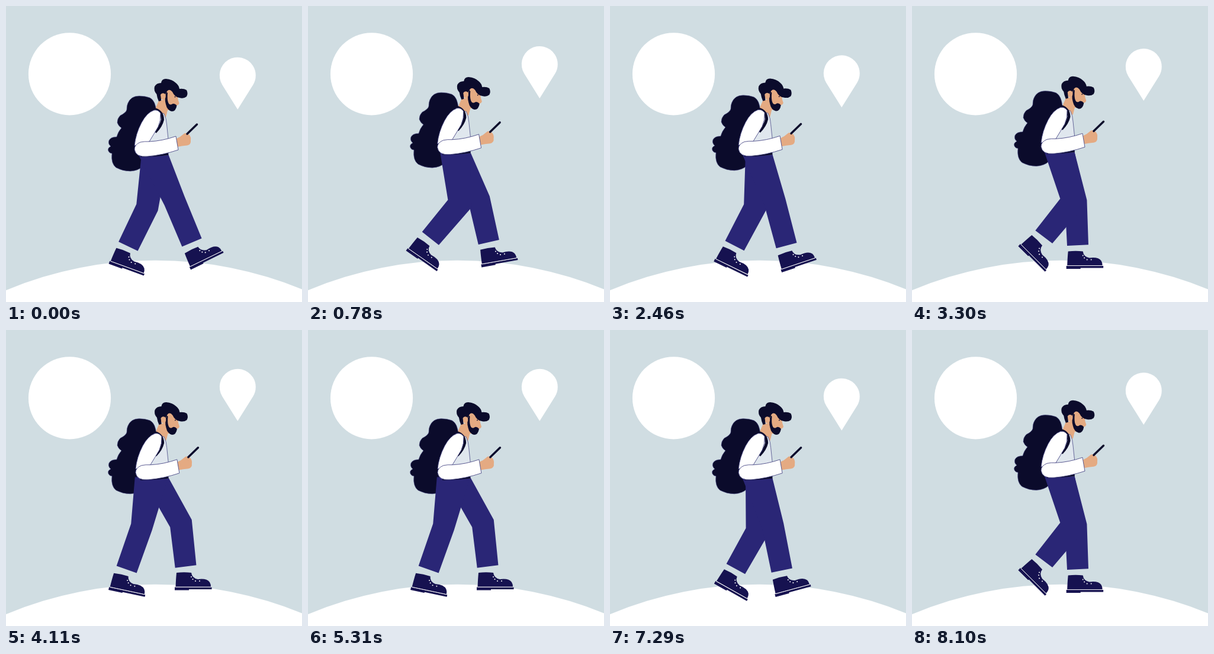
An HTML page with a canvas that plays this animation: 500 px wide and 500 px high, repeating every 8130 ms.

```html
<!DOCTYPE html>
<html lang="en">
<head>
<meta charset="utf-8">
<title>Walking traveller</title>
<style>
  html, body { margin: 0; width: 100%; height: 100%; overflow: hidden; background: #d0dde2; }
  canvas { display: block; width: 500px; height: 500px; }
</style>
</head>
<body>
<canvas id="stage" width="500" height="500"></canvas>
<script>
const ctx = document.getElementById('stage').getContext('2d');
const LOOP = 8130, FRAME = 30, CYCLE = 1200;
const SKY = '#d0dde2', WHITE = '#ffffff', NAVY = '#0b0b2b', PANTS = '#2a2676',
      BOOT = '#161250', SKIN = '#e4aa82', SHIRT = '#e0e7ee', LINE = '#4a4a86';

// Each pose: time, thigh angle, shin angle, boot tilt
const legA = {
  thigh: 82, shin: 76, seat: 27, sag: 0.35, gap: 11.5, heel: -5.3,
  poses: [
    [0, 25, 22.7, -26], [60, 20.4, 14.9, -18.5], [510, -14.9, -19.4, 12],
    [660, -10.5, -34.5, 26], [780, 2.8, -38.4, 35], [900, 13, -37, 45]
  ]
};
const legB = {
  thigh: 86, shin: 73, seat: 21, sag: 0, gap: 10, heel: -3.8,
  poses: [
    [0, -8, -25.7, 20], [60, -4, -27.3, 26], [270, 14, -36, 45],
    [510, 31.3, 7, 0], [780, 26.9, 13, -10], [900, 18, 2.7, 0]
  ]
};

// Smooth periodic blend between poses
function poseAt(poses, t) {
  const n = poses.length;
  t %= CYCLE;
  let i = n - 1;
  while (poses[i][0] > t) i--;
  const [p, q, r, s] = [-1, 0, 1, 2].map(k => {
    const turn = Math.floor((i + k) / n);
    const [time, ...angles] = poses[i + k - turn * n];
    return { time: time + turn * CYCLE, angles };
  });
  const h = r.time - q.time, u = (t - q.time) / h, v = 1 - u;
  return q.angles.map((_, c) => {
    const slope = (a, b) => (b.angles[c] - a.angles[c]) / (b.time - a.time);
    const tangent = (a, b, d) =>
      (slope(a, b) * (d.time - b.time) + slope(b, d) * (b.time - a.time)) / (d.time - a.time);
    return q.angles[c] * v * v * (1 + 2 * u) + r.angles[c] * u * u * (1 + 2 * v)
      + h * u * v * (tangent(p, q, r) * v - tangent(q, r, s) * u);
  });
}

function shape(d, fill, stroke, width = 1) {
  const path = new Path2D(d);
  if (fill) { ctx.fillStyle = fill; ctx.fill(path); }
  if (stroke) { ctx.strokeStyle = stroke; ctx.lineWidth = width; ctx.stroke(path); }
}

function disc(x, y, r, fill) {
  ctx.fillStyle = fill;
  ctx.beginPath();
  ctx.arc(x, y, r, 0, 7);
  ctx.fill();
}

function shifted(x, y, draw) {
  ctx.save();
  ctx.translate(x, y);
  draw();
  ctx.restore();
}

function drawPin(y) {
  const a = Math.asin(30.5 / 57.5);
  ctx.fillStyle = WHITE;
  ctx.beginPath();
  ctx.arc(391.3, y, 30.5, Math.PI - a, a);
  ctx.lineTo(391.3, y + 57.5);
  ctx.fill();
}

function drawBoot() {
  shape('M-13 0Q0 -1.5 12 0Q13 9 23 11Q38 9 43 16Q45 19 45 24H-14.5Q-14 10 -13 0Z', BOOT);
  shape('M-16 24.5H46.5V28H8V29.5H-16Z', BOOT);
  shape('M-14.5 24.2H45.5', null, WHITE, 0.9);
  for (const [x, y] of [[12, 7], [14.5, 11], [19, 14], [26, 14]]) disc(x, y, 1, WHITE);
}

function drawLeg(leg, t, hx, hy) {
  const rad = Math.PI / 180;
  const [thigh, shin, tilt] = poseAt(leg.poses, t);
  const along = ([x, y], d, deg) => [x + d * Math.sin(deg * rad), y + d * Math.cos(deg * rad)];
  const side = ([x, y], d, deg) => [x + d * Math.cos(deg * rad), y - d * Math.sin(deg * rad)];
  const knee = along([hx, hy], leg.thigh, thigh);
  const cuff = along(knee, leg.shin, shin);
  const mid = (thigh + shin) / 2;
  const kneecap = 18.5 + (thigh - shin) ** 2 / 350;
  const seat = leg.seat - leg.sag * Math.min(0, thigh);

  ctx.fillStyle = PANTS;
  ctx.beginPath();
  [
    [hx - seat, hy - 5], side(knee, -18.5, mid), side(cuff, -18, shin),
    side(cuff, 18, shin), side(knee, kneecap, mid), [hx + 24, hy - 5]
  ].forEach(p => ctx.lineTo(...p));
  ctx.fill();

  shifted(...side(along(cuff, leg.gap, shin), leg.heel, shin), () => {
    ctx.rotate(tilt * rad);
    drawBoot();
  });
}

function drawPack() {
  shape('M254 180Q253 160 243 155Q235 152 225 152Q211 152 206 164Q204 168 204 175' +
    'Q203 180 193 185Q188 190 188 197Q190 203 195 206Q189 213 187 221' +
    'Q177 221 174 227Q172 233 177 237Q171 240 173 245Q175 249 179 249' +
    'Q177 266 186 273Q197 279 210 279Q224 278 231 271L246 250Z', NAVY, LINE, 0.6);
}

function drawHead() {
  shape('M258 160L252 174Q260 183 270 188L274 172L268 158Z', SKIN);
  shape('M266 141H281Q287 145 290 153Q290 158 292.5 164Q292 167 288 168L284 176H273L266 160Z', SKIN);
  // hair
  shape('M258 161Q255 154 254.5 149Q249 143 251 136Q254 130 262 130Q263 123 270 123' +
    'Q281 124 287 130Q292 134 293 140Q300 139 305 142Q308 148 305 153Q300 157 293 155' +
    'Q285 154 281 145Q276 139 272 144L268 151L262 150V160Z', NAVY);
  // beard
  shape('M271 145Q267 157 270 166Q272 176 280 178Q287 178 288.5 168Q284 163 280 166' +
    'Q276 168 274 163Q272 158 273 147Z', NAVY);
  shape('M261 150Q263 146 268 148Q271 151 269 156Q266 160 262 157Z', SKIN);
  disc(285.5, 153.5, 0.9, NAVY);
}

function drawTorso() {
  shape('M250 176L267 182Q271 190 271.5 200L274 224V252L228 254L232 215Z', SHIRT, LINE, 0.8);
  shape('M227 243H274V252Q250 255 227 255Z', NAVY);
  shape('M251 174.5Q264 178 264.5 192Q262 203 252 213', null, NAVY, 5);
}

function drawArm() {
  shape('M288 224Q295 221 299 217Q303 213 306 216L309 217Q313 221 312 227Q313 234 306 235.5Q297 236 289 238Z', SKIN);
  ctx.lineCap = 'round';
  shape('M306 216L322.5 200', null, NAVY, 3.5);
  ctx.lineCap = 'butt';
  shape('M250 176Q238 180 229 197Q219 216 217 236L242 229Q250 216 257 204Q262 193 261 181Q257 175 250 176Z', WHITE, LINE, 0.9);
  shape('M242 229Q264 228 287 220L291 243Q264 252 239 254Q219 256 217 242Q217 234 227 230Q234 228.5 242 229Z', WHITE, LINE, 0.9);
}

function draw(t) {
  const turn = 2 * Math.PI * t / CYCLE;
  const bob = Math.abs(Math.sin(turn)) ** 1.7;   // two rises per stride
  const sway = 1 - Math.cos(turn);
  const bounce = 22 * Math.abs((t % CYCLE) / (CYCLE / 2) - 1) ** 1.6;

  ctx.fillStyle = SKY;
  ctx.fillRect(0, 0, 500, 500);
  disc(107.5, 114.8, 69.6, WHITE);
  disc(252, 1083.7, 654, WHITE);
  drawPin(95.2 + bounce);

  shifted(0, -8.4 * bob, drawPack);
  for (const leg of [legB, legA]) drawLeg(leg, t, 250, 255 - 5.5 * bob);
  shifted(1.8 * bob, -4.3 * bob, drawHead);
  shifted(0.5 * bob, -5 * bob, drawTorso);
  shifted(sway, -4.7 * bob, drawArm);
}

function tick() {
  const t = performance.now() % LOOP;
  draw(Math.floor(t / FRAME) * FRAME);
  requestAnimationFrame(tick);
}
tick();
</script>
</body>
</html>
```
